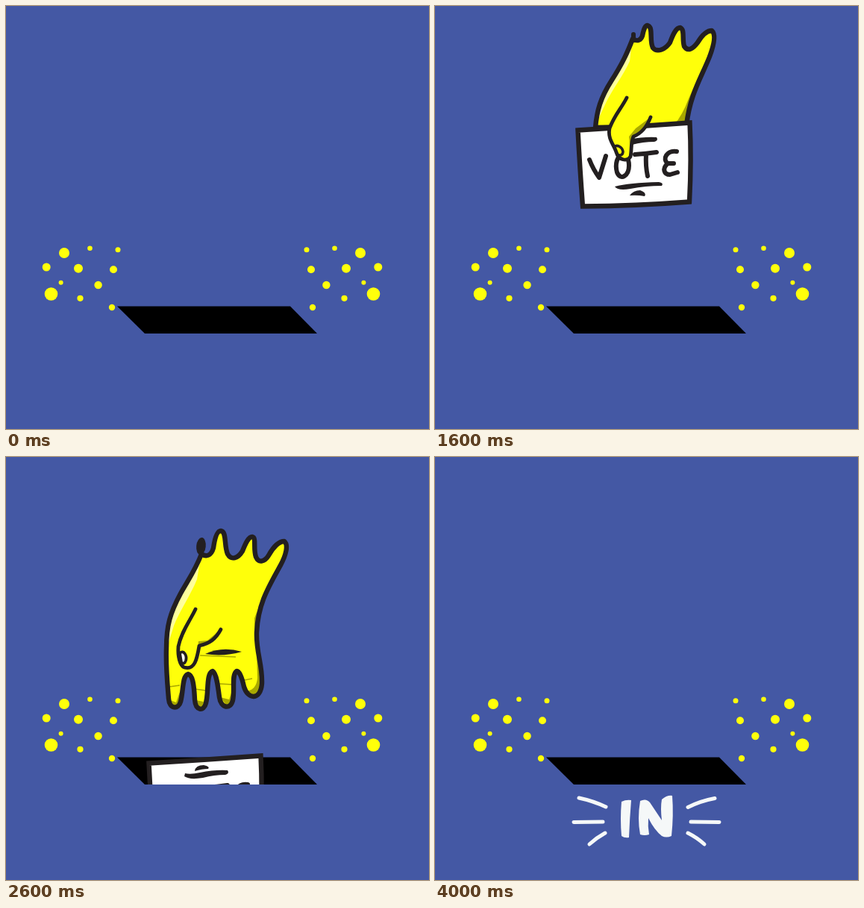
These frames come from a looping animation (567x567 px, 4200 ms). An HTML page:

```html
<!DOCTYPE html>
<html lang="en">
<head>
<meta charset="utf-8">
<title>Vote in</title>
<style>
  html, body { margin: 0; width: 100%; height: 100%; overflow: hidden; background: #4458a4; }
  svg { display: block; width: 100vw; height: 100vh; }

  .ink { fill: #231f20; }
  .line { fill: none; stroke: #231f20; stroke-linecap: round; stroke-linejoin: round; }
  .skin { fill: #ffff0a; }
  .shade { fill: #a9a800; }
  .glow { fill: #ffff9c; }
  .crease { fill: none; stroke: #a9a800; stroke-width: 1.6; }
  .white { fill: #f5f8f8; }
  .ray { fill: none; stroke: #f5f8f8; stroke-width: 5; stroke-linecap: round; }

  .held, .grip, .open, .in { animation: 4.2s step-end infinite; }
  .held { animation-name: lower; }
  .grip { animation-name: let-go; }
  .open { animation-name: withdraw; }
  .in   { animation-name: blink; }

  @keyframes lower {
    0%     { transform: translateY(-300px); }
    4.76%  { transform: translateY(-226px); }
    9.52%  { transform: translateY(-204px); }
    14.28% { transform: translateY(-183px); }
    19.04% { transform: translateY(-129px); }
    23.8%  { transform: translateY(-104px); }
    28.57% { transform: translateY(-71px); }
    33.33% { transform: translateY(-35px); }
    38.09% { transform: translateY(0); }
    42.85% { transform: translateY(46px); }
    47.61% { transform: translateY(75px); }
    49.99% { transform: translateY(112px); }
    52.38% { transform: translateY(149px); }
    54.76% { transform: translateY(171px); }
    57.14% { transform: translateY(193px); }
    59.52% { transform: translateY(215px); }
    61.9%  { transform: translateY(244px); }
    64.28% { transform: translateY(273px); }
    66.66%, 100% { transform: translateY(320px); }
  }
  @keyframes let-go {
    0% { opacity: 1; }
    49.99%, 100% { opacity: 0; }
  }
  @keyframes withdraw {
    0%     { transform: translateY(0); opacity: 0; }
    49.99% { transform: translateY(0); opacity: 1; }
    71.42% { transform: translateY(-35px); opacity: 1; }
    76.19% { transform: translateY(-92px); opacity: 1; }
    80.95% { transform: translateY(-150px); opacity: 1; }
    85.71% { transform: translateY(-210px); opacity: 1; }
    90.47% { transform: translateY(-272px); opacity: 1; }
    95.23%, 100% { transform: translateY(-345px); opacity: 0; }
  }
  @keyframes blink {
    0%, 71.42%, 80.95%, 90.47% { opacity: 0; }
    66.66%, 76.19%, 85.71%, 95.23% { opacity: 1; }
    100% { opacity: 0; }
  }
</style>
</head>
<body>
<svg viewBox="0 0 567 567">
  <defs>
    <clipPath id="above"><rect width="567" height="439"/></clipPath>
    <g id="dots" class="skin">
      <circle cx="78" cy="331" r="7"/>
      <circle cx="112.5" cy="324.7" r="3.3"/>
      <circle cx="150" cy="326.8" r="3.5"/>
      <circle cx="54.2" cy="350" r="5.5"/>
      <circle cx="97" cy="351.7" r="6"/>
      <circle cx="144" cy="353.3" r="5"/>
      <circle cx="73.6" cy="370.7" r="3"/>
      <circle cx="123.6" cy="374" r="5.2"/>
      <circle cx="60.5" cy="386" r="8.8"/>
      <circle cx="99.5" cy="391.8" r="4.1"/>
      <circle cx="142" cy="404" r="4.2"/>
    </g>
    <!-- outlines, each used once as fill and once as line -->
    <path id="palm" d="M215 256C215 226 220 209 234 183C246 162 255 149 262 130C268 134 275 133 278 122C280 108 283 99 288 99C296 100 292 118 297 130C302 139 311 136 317 126C321 116 325 107 330 107C336 108 331 122 335 134C339 143 347 140 352 132C358 121 366 113 373 113C379 118 375 132 368 145C352 174 338 196 336 235C335 262 344 278 343 304C341 327 324 325 319 308C316 294 312 286 309 287C302 292 307 312 304 326C301 339 288 337 286 322C284 306 282 290 277 287C268 290 272 314 268 330C265 342 254 340 253 325C252 304 250 292 244 291C236 293 238 314 234 328C231 339 219 338 218 324C216 300 214 280 215 256Z"/>
    <path id="back" d="M215 163C217 140 222 123 236 101C252 76 258 62 265 44C271 48 276 46 278 40C280 30 282 26 285 26C293 28 287 46 292 56C298 63 309 58 315 49C319 38 323 29 329 29C335 32 331 44 334 54C339 62 346 57 352 49C358 39 365 33 371 33C377 38 374 52 368 68C356 98 342 118 337 160Z"/>
    <path id="thumb" d="M257 123C250 137 240 147 234 164C231 178 240 186 243 196C246 207 258 209 262 202C264 193 262 184 266 175C276 171 284 162 289 149"/>
  </defs>

  <rect width="567" height="567" fill="#4458a4"/>
  <use href="#dots"/>
  <use href="#dots" transform="translate(553) scale(-1 1)"/>
  <path d="M149 402.5H381L417 439H186Z"/>

  <!-- open hand -->
  <g class="open">
    <use href="#palm" class="skin"/>
    <path class="glow" d="M261 134C255 152 246 168 235 186C222 208 217 226 217 252L225 226C232 208 248 184 256 164Z"/>
    <path class="shade" d="M371 138C352 174 338 196 336 235L333 246L333 216L344 188L358 160Z
      M336 262L342 300C341 324 330 322 322 314Q336 312 337 296Z
      M234 312Q233 334 224 335L218 325L228 329Z
      M269 310Q268 336 260 336L254 326L265 328Z
      M305 308Q304 333 296 333L287 322L299 325Z
      M258 247L270 246L289 230Q280 250 262 253L256 268Z"/>
    <path class="crease" d="M260 266L308 268M219 308L233 306M253 311L268 313M286 304L304 305M315 300L330 297"/>
    <use href="#palm" class="line" stroke-width="6.4"/>
    <ellipse class="ink" cx="261.500" cy="119.500" rx="6.3" ry="11.500" transform="rotate(6 261 119)"/>
    <path class="line" stroke-width="4.8" d="M254 204C247 219 235 234 231 254C230 267 233 280 239 282C253 286 256 271 259 253C273 250 281 244 288 231"/>
    <path class="line" stroke-width="3.8" style="fill:#fff" d="M233 263C238 258 243 266 241 273Q239 279 235 275Z"/>
    <path class="ink" d="M267 264Q290 253 316 261Q292 268 267 264Z"/>
  </g>

  <g clip-path="url(#above)">
    <g class="held">
      <!-- gripping hand, behind the card -->
      <g class="grip">
        <use href="#back" class="skin"/>
        <path class="glow" d="M264 48C258 66 250 82 236 103C224 122 219 140 217 156L228 132C236 114 252 94 261 74Z"/>
        <path class="shade" d="M370 62C356 98 342 118 337 160H320Q332 146 340 124Q354 92 370 62Z"/>
        <use href="#back" class="line" stroke-width="6.4"/>
        <path class="line" stroke-width="6" d="M266 38V46"/>
      </g>

      <!-- card -->
      <path fill="#fff" stroke="#231f20" stroke-width="6.4" d="M191.5 166.5Q265 162 341.5 156.5Q344 205 341 262.5Q270 268 198 268.5Q194 215 191.5 166.5Z"/>
      <path class="ink" d="M253 177Q254 169 265 169Q274 171 271 174Q263 174 253 177Z
        M240 180Q247 182 260 179Q280 175 297 176Q300 180 294 182Q279 182 264 186Q246 189 239 184Z
        M241 242Q260 237 300 236Q307 237 304 241Q282 241 262 245Q245 248 241 242Z
        M261 254Q266 247 275 247Q284 250 281 255Q271 253 261 254Z"/>
      <g class="line" stroke-width="6">
        <path d="M207 206Q212 219 220 230Q225 214 229 201"/>
        <path d="M252 199C244 200 241 212 244 223C249 235 260 227 260 214C260 203 255 198 248 202"/>
        <path d="M268 199Q283 198 297 196M283 199Q282 214 285 228"/>
        <path d="M324 195C311 193 304 205 312 211L320 211M312 211C304 218 307 226 315 226L325 223"/>
      </g>

      <!-- thumb, in front of the card -->
      <g class="grip">
        <use href="#thumb" class="skin"/>
        <path class="shade" d="M260 175L269 164L289 149Q282 166 266 175L262 194Z"/>
        <use href="#thumb" class="line" stroke-width="4.8"/>
        <path class="line" stroke-width="3.6" d="M240 189C244 185 251 189 252 195C252 200 247 202 244 198Z"/>
      </g>
    </g>
  </g>

  <g class="in">
    <path class="white" d="M250 462Q256 459 263 460Q261 484 260 510Q254 511 250 508Q248 485 250 462Z
      M275 461Q283 457 288 463L304 487Q302 470 304 459Q311 453 318 454Q320 480 317 508Q310 511 304 508Q294 500 286 484Q285 495 287 506Q281 508 275 506Q271 485 275 461Z"/>
    <path class="ray" d="M193 457Q212 461 229 469M186 489.500L225 489M207 519Q217 510 228 504M375 457.500Q356 461 339 469.500M343 489L381 489.500M339 504Q351 510 361 519"/>
  </g>
</svg>
</body>
</html>
```
